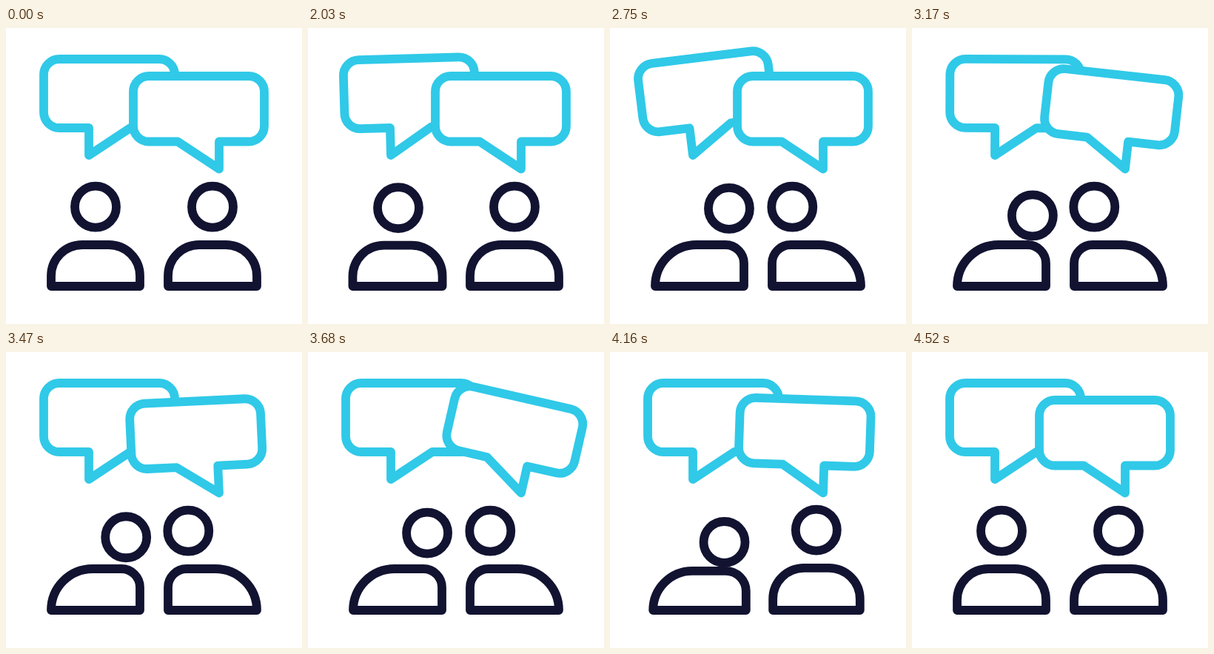
An HTML page with a canvas that plays this animation: 400x400 px, repeating every 4550 ms.

```html
<!DOCTYPE html>
<html>
<head>
<meta charset="utf-8">
<style>
html, body { margin: 0; width: 100%; height: 100%; overflow: hidden; background: #fff; }
canvas { display: block; }
</style>
</head>
<body>
<canvas id="stage" width="400" height="400"></canvas>
<script>
const ctx = document.getElementById('stage').getContext('2d');
const LOOP = 4550, REST = 2030, DARK = '#121331', CYAN = '#30c9e8', TURN = 330, FLOOR = 349;

const clamp = p => Math.max(0, Math.min(1, p));
const smooth = p => (p = clamp(p), p * p * (3 - 2 * p));
const hump = (t, start, length) => Math.sin(Math.PI * clamp((t - start) / length));
const mix = (a, b, p) => a + (b - a) * p;

// Eased value between [time, value] keys
function keyed(keys, t) {
  const i = keys.findIndex(k => k[0] > t);
  if (i < 0) return keys[keys.length - 1][1];
  if (i === 0) return keys[0][1];
  const [t0, a] = keys[i - 1], [t1, b] = keys[i];
  return mix(a, b, smooth((t - t0) / (t1 - t0)));
}

const leftSwing = [[1985, 0], [2250, -20.5], [2435, 11], [2690, -8.5], [2970, 3.8], [3200, 0]];
const rightSwing = [[3080, 0], [3280, 14.7], [3450, -3.2], [3650, 13.6], [3910, -4.7], [4200, 2.3], [4440, 0]];

// Drawn as the left-hand shape; mirrored for the right-hand one
function bubble(mirror, top, bottom, angle) {
  const tip = bottom + 37, r = 21;
  ctx.save();
  if (mirror) ctx.transform(-1, 0, 0, 1, 400, 0);
  ctx.translate(112, tip);
  ctx.rotate((mirror ? -angle : angle) * Math.PI / 180);
  ctx.translate(-112, -tip);
  ctx.beginPath();
  ctx.moveTo(112, tip);
  ctx.lineTo(112, bottom);
  ctx.arcTo(51, bottom, 51, top, r);
  ctx.arcTo(51, top, 228, top, r);
  ctx.arcTo(228, top, 228, bottom, r);
  ctx.arcTo(228, bottom, 168, bottom, r);
  ctx.lineTo(168, bottom);
  ctx.closePath();
  ctx.fill();
  ctx.strokeStyle = CYAN;
  ctx.stroke();
  ctx.restore();
}

function person(mirror, t, turnAt, backAt, headTo, nod) {
  const turned = smooth((t - turnAt) / TURN) - smooth((t - backAt) / TURN);
  let squash = 0, dip = 0;
  for (const start of [turnAt, backAt]) {
    const push = hump(t, start, 240), rebound = 1.2 * hump(t, start + 240, 180);
    squash += 3.7 * push ** 2 - rebound;
    dip += 23 * push ** 3 - rebound;
  }
  const left = 61 - squash, right = 181 + squash, top = 293 + squash;
  const outer = Math.min(mix(42, 56, turned), FLOOR - top), inner = mix(42, 25, turned);

  ctx.save();
  if (mirror) ctx.transform(-1, 0, 0, 1, 400, 0);
  ctx.strokeStyle = DARK;
  ctx.beginPath();
  ctx.moveTo(left, FLOOR);
  ctx.arcTo(left, top, right, top, outer);
  ctx.arcTo(right, top, right, FLOOR, inner);
  ctx.lineTo(right, FLOOR);
  ctx.closePath();
  ctx.stroke();
  ctx.beginPath();
  ctx.arc(mix(121, headTo, turned) + nod / 5, 241.7 + dip + nod, 28, 0, 7);
  ctx.stroke();
  ctx.restore();
}

function draw(t) {
  ctx.fillStyle = '#fff';
  ctx.fillRect(0, 0, 400, 400);
  ctx.lineWidth = 11.8;
  ctx.lineJoin = ctx.lineCap = 'round';
  const nod = 12 * hump(t, 2560, 1340) ** 2;
  person(false, t, 2000, 4080, 160.5, nod);
  person(true, t, 2050, 3845, 153.7, 0);
  bubble(false, 42, 135, keyed(leftSwing, t));
  bubble(true, 65, 153.5, keyed(rightSwing, t));
}

const begin = performance.now();
function frame() {
  const t = (performance.now() - begin) % LOOP;
  draw(t < REST ? 0 : t);
  requestAnimationFrame(frame);
}
frame();
</script>
</body>
</html>
```
